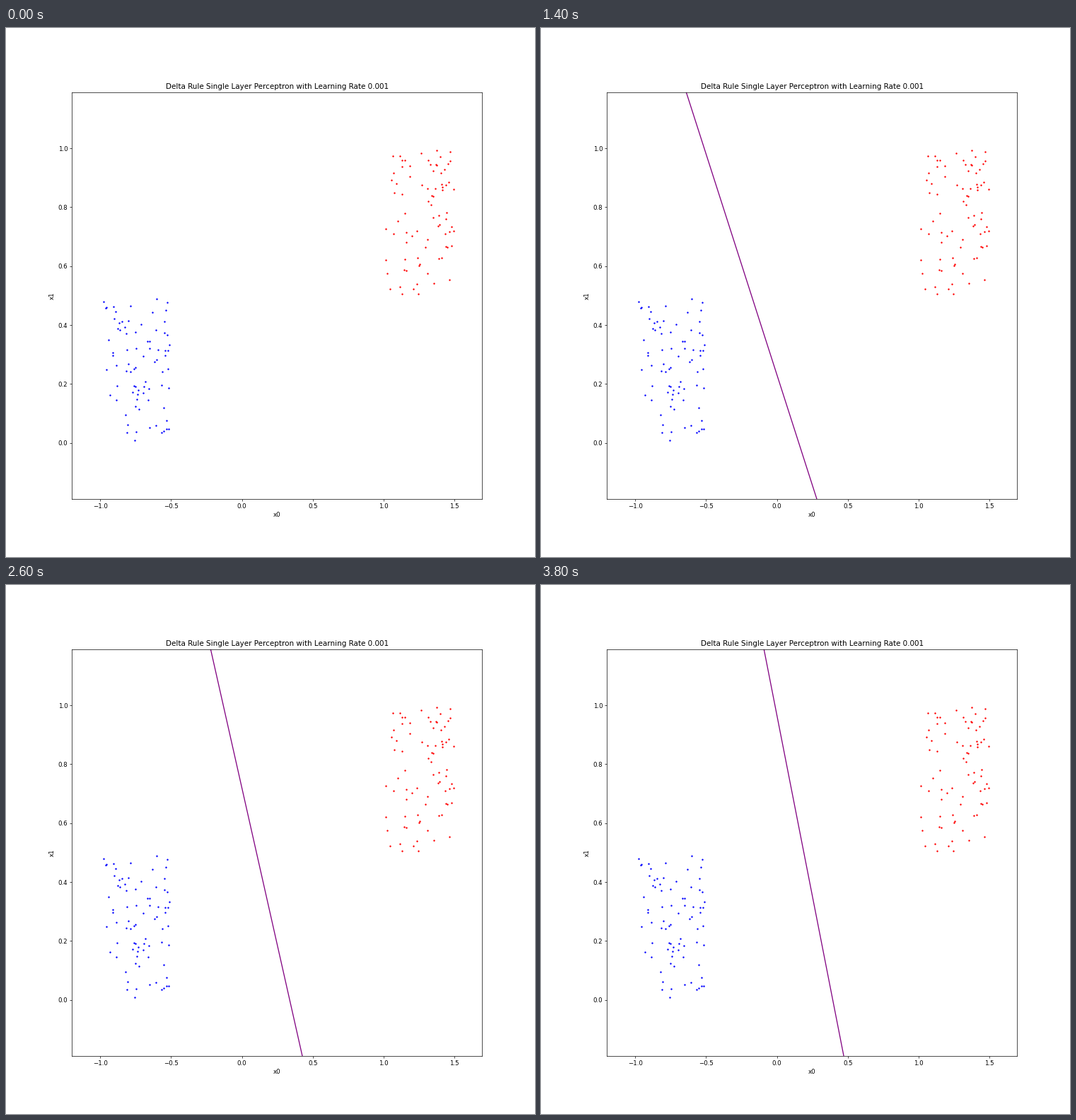
Animation, 748 px wide and 748 px high, one loop 4000 ms. Source, as a matplotlib script:

```python
import numpy as np
import matplotlib.pyplot as plt
from matplotlib.animation import FuncAnimation

SIZE, DPI = 748, 62
FRAMES = 20
POINTS = 80
X_ENDS = np.array([-0.998, 1.494])

plt.rcParams["font.family"] = "DejaVu Sans"
fig = plt.figure(figsize=(SIZE / DPI, SIZE / DPI), dpi=DPI)
ax = fig.add_axes([93.3 / SIZE, 82.3 / SIZE, 580 / SIZE, 575 / SIZE])
ax.set_xlim(-1.199, 1.695)
ax.set_ylim(-0.19, 1.191)
ax.set_title("Delta Rule Single Layer Perceptron with Learning Rate 0.001")
ax.set_xlabel("x0")
ax.set_ylabel("x1")

# Two uniform clusters, each half a unit wide and high.
rng = np.random.default_rng(4)
for x, y, color in ((-1, 0, "blue"), (1, 0.5, "red")):
    px, py = rng.uniform(0.005, 0.495, (2, POINTS))
    ax.scatter(x + px, y + py, s=3, color=color)

# Boundary at a few training steps: height at its left end, and slope.
key_steps = [1, 4, 8, 13, 19]
key_heights = [-0.1374, 0.8972, 1.9623, 2.8504, 3.4147]
key_slopes = [-0.4572, -1.0347, -1.6315, -2.1354, -2.4535]


def curve(values):
    """Smooth curve through the key steps."""
    return np.poly1d(np.polyfit(key_steps, values, len(key_steps) - 1))


height_at, slope_at = curve(key_heights), curve(key_slopes)
boundary, = ax.plot([], [], color="purple")


def update(step):
    if step == 0:
        boundary.set_data([], [])
    else:
        rise = slope_at(step) * (X_ENDS - X_ENDS[0])
        boundary.set_data(X_ENDS, height_at(step) + rise)
    return boundary,


anim = FuncAnimation(fig, update, frames=FRAMES, interval=200, repeat=True,
                     repeat_delay=0, blit=False)
plt.show()
```
